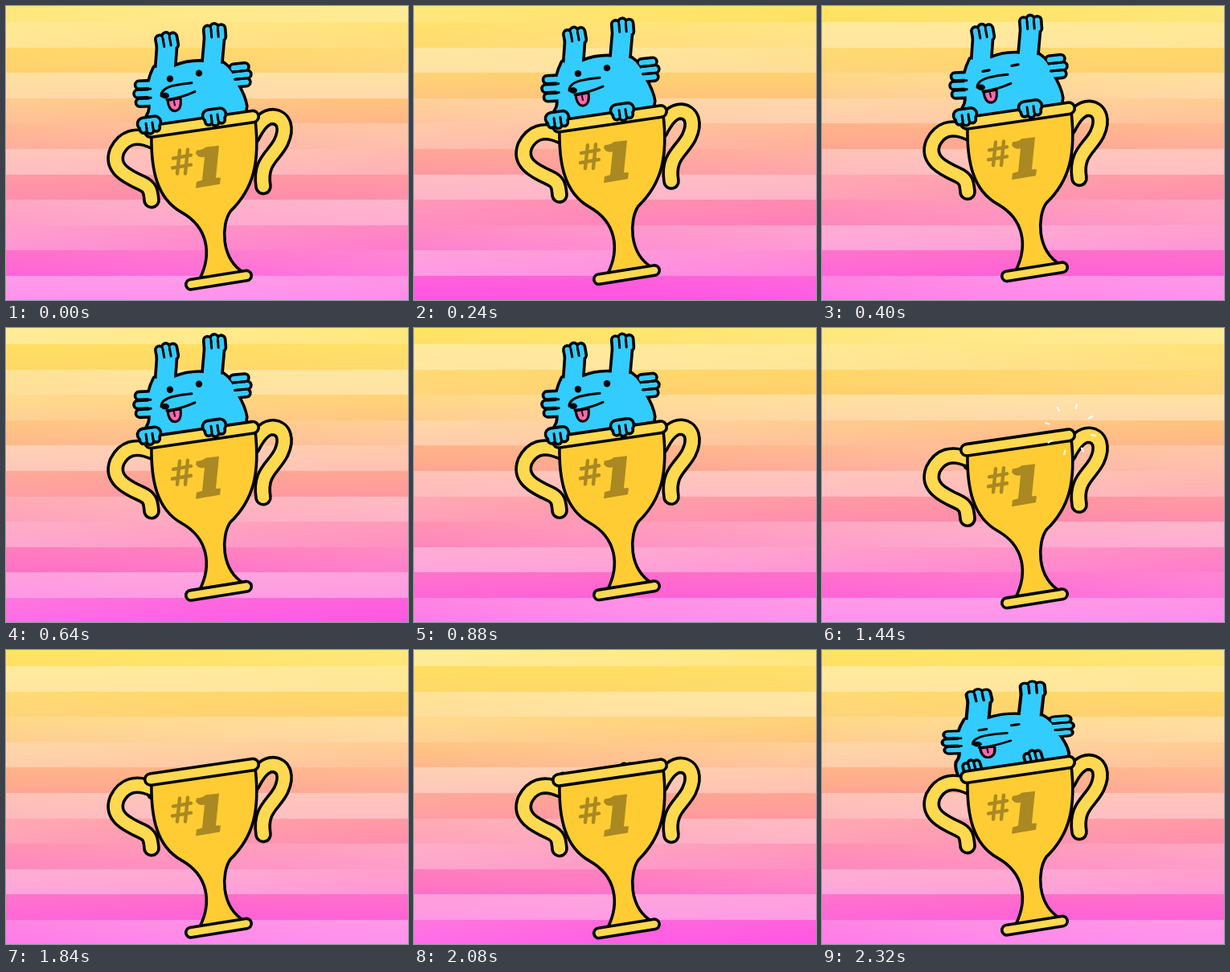
Recreate the animation shown at these times as an HTML page with a canvas. Size 500x366 px, loop 2400 ms.

```html
<!DOCTYPE html>
<html lang="en">
<head>
<meta charset="utf-8">
<title>Number one trophy</title>
<style>
html, body { margin: 0; width: 100%; height: 100%; overflow: hidden; }
canvas { display: block; width: 500px; height: 366px; }
</style>
</head>
<body>
<canvas id="stage" width="500" height="366"></canvas>
<script>
const ctx = document.getElementById('stage').getContext('2d');
const LOOP = 2400, STEP = 80, TAU = 2 * Math.PI;
const INK = '#000', GOLD = '#ffcc33', LIGHT = '#ffd94f', BLUE = '#33ccff', OLIVE = '#aa8922';
const LINE = 3.6;

const ramp = (t, from, to) => Math.max(0, Math.min(1, (t - from) / (to - from)));
const pulse = (t, peak, width) => Math.max(0, 1 - Math.abs(t - peak) / width);

function stroke(path, width, color = INK) {
  ctx.strokeStyle = color;
  ctx.lineWidth = width;
  ctx.stroke(path);
}

function fill(path, color) {
  ctx.fillStyle = color;
  ctx.fill(path);
}

function seg(x1, y1, x2, y2, width, color) {
  const p = new Path2D();
  p.moveTo(x1, y1);
  p.lineTo(x2, y2);
  stroke(p, width, color);
}

function oval(x, y, rx, ry, color) {
  const p = new Path2D();
  p.ellipse(x, y, rx, ry, 0, 0, TAU);
  fill(p, color);
}

// Thick outlined line with round ends.
function tube(path, size, color) {
  stroke(path, size + LINE);
  stroke(path, size - LINE, color);
}

// Background: a gradient under bands whose whiteness swings.
const base = ctx.createLinearGradient(0, 0, 0, 366);
['#ffdf3f', '#ffc658', '#ff9382', '#ff66ae', '#ff34e2']
  .forEach((c, i) => base.addColorStop(i / 4, c));

function background(t) {
  ctx.fillStyle = base;
  ctx.fillRect(0, 0, 500, 366);
  for (let i = 0; i < 12; i++) {
    const top = i && Math.round(31.6 * i - 11.6), end = Math.round(31.6 * i + 20);
    const glow = ctx.createLinearGradient(0, 0, 500, 0);
    for (let k = 0; k <= 2; k++) {
      const white = 0.31 + 0.16 * Math.sin(5 * TAU * t / LOOP + 2.4 * i + 0.5 * k);
      glow.addColorStop(k / 2, `rgba(255,255,255,${white})`);
    }
    ctx.fillStyle = glow;
    ctx.fillRect(0, top, 500, end - top);
  }
}

// Trophy
const leftHandle = new Path2D('M184 169C160 158 146 165 138 181C130 202 149 212 169 221C180 226 180 232 181 242');
const rightHandle = new Path2D('M306 163C316 143 324 138 332 138C346 139 350 153 342 170C333 188 315 194 320 225');
const bowl = new Path2D('M181 160C180 205 188 240 218 257C252 276 256 310 241 340' +
  'L297 333C266 315 268 272 279 256C308 228 316 195 310 142Z');
const foot = new Path2D('M230 347L299 336');
const rim = new Path2D('M180 156.5L307 138');
const hash = new Path2D('M216 180L213 209M226 179L223 209M208 190L230 186M207 202L230 198');
const one = new Path2D('M236 184L237 180Q246 179 248 176L265 174L261 214L267 214L266 222' +
  'L236 227L237 219L244 217L247 188Q240 190 236 184Z');

function trophy() {
  tube(leftHandle, 18, LIGHT);
  tube(rightHandle, 18, LIGHT);
  fill(bowl, GOLD);
  stroke(bowl, LINE);
  tube(foot, 12.5, LIGHT);
  tube(rim, 14.5, LIGHT);
  stroke(hash, 4.4, OLIVE);
  fill(one, OLIVE);
}

// Three parallel fingers with the folds between them.
function hand(x, y, angle, gap, len, size) {
  const c = Math.cos(angle), s = Math.sin(angle);
  const line = (k, a, b, width) =>
    [x - s * gap * k + c * a, y + c * gap * k + s * a, x - s * gap * k + c * b, y + c * gap * k + s * b, width];
  return {
    limbs: [-1, 0, 1].map(k => line(k, 0, len + (k ? 0 : 2), size)),
    folds: [-0.5, 0.5].map(k => line(k, 0, len, 3))
  };
}

// Joins limbs and hands into one outlined silhouette.
function merge(hands, limbs = [], torso = new Path2D()) {
  const all = [...limbs, ...hands.flatMap(h => h.limbs)];
  stroke(torso, LINE * 2);
  all.forEach(([a, b, c, d, w]) => seg(a, b, c, d, w + LINE));
  fill(torso, BLUE);
  all.forEach(([a, b, c, d, w]) => seg(a, b, c, d, w - LINE, BLUE));
  hands.forEach(h => h.folds.forEach(f => seg(...f)));
}

const torso = new Path2D('M184 170Q174 150 176 138Q183 128 177 112Q176 95 185 77' +
  'Q197 80 210 76Q224 70 240 70L270 72Q282 80 286 96Q296 112 298 125Q296 140 290 160Z');
const ears = [[198, 80, 200, 52, 25], [256, 76, 259, 42, 25]];
const tufts = [
  hand(180, 109, 3.1, 11, 14, 10), hand(284, 87, -0.1, 9.5, 14, 10),
  hand(201, 50, -1.75, 8.5, 10, 10), hand(260, 39, -1.65, 8.5, 10, 10)
];
const snout = new Path2D('M193 112Q193 104 206 100Q218 97 231 96M200 117Q217 115 235 107');
const tongue = new Path2D('M201 118Q203 131 210 131Q219 130 217 115Z');

function face(shut) {
  for (const [x, y] of [[204, 91], [240, 84]]) {
    if (shut) seg(x - 4, y + 1, x + 4, y - 0.5, 3.4);
    else oval(x, y, 4.2, 4.2, INK);
  }
  fill(tongue, '#ff66b3');
  stroke(tongue, 3);
  seg(209, 119, 210, 124, 2);
  stroke(snout, 3);
  oval(198, 112, 5, 3.8, INK);
}

function dog(t) {
  const drop = 150 * (t < 1700 ? ramp(t, 1000, 1200) ** 2 : (1 - ramp(t, 2120, 2320)) ** 2);
  if (drop >= 150) return;
  const squash = pulse(t, 2320, 80) + 0.4 * pulse(t, 960, 80);
  ctx.save();
  ctx.beginPath();
  ctx.moveTo(0, -60);
  ctx.lineTo(500, -60);
  ctx.lineTo(500, 110);
  ctx.lineTo(0, 182);
  ctx.clip();
  ctx.translate(238, 140 + drop);
  ctx.scale(1 + 0.12 * squash, 1 - 0.13 * squash);
  ctx.translate(-238, -140);
  merge(tufts, ears, torso);
  face((t >= 400 && t < 560) || t >= 2240);
  ctx.restore();
}

function grip(x, y) {
  merge([hand(x, y, 1.43, 8, 7, 9)], [[x - 7, y + 1, x + 7, y - 1, 15]]);
}

function peek(x, y) {
  merge([hand(x, y, -1.85, 7, 8, 8)]);
}

// Glint rays spreading from the rim.
function glint(t) {
  const k = ramp(t, 1280, 1600), r = 10 + 34 * k, tip = r + 5 * Math.sin(Math.PI * k);
  if (k === 0 || k === 1) return;
  for (let a = 0.25; a < TAU; a += TAU / 8) {
    const c = Math.cos(a), s = Math.sin(a);
    seg(309 + c * r, 131 + s * r, 309 + c * tip, 131 + s * tip, 2, '#fff');
  }
}

function bob(t) {
  const a = TAU * (t / LOOP - 1 / 3);
  return -4.6 - 10.3 * Math.cos(a) - 1.2 * Math.sin(a) ** 2;
}

function draw(t) {
  const holding = t < 1040;
  ctx.lineCap = ctx.lineJoin = 'round';
  background(t);
  ctx.save();
  ctx.translate(0, bob(t));
  dog(t);
  if (!holding) {
    const sink = 25 * ramp(t, 1200, 1280) * (1 - ramp(t, 2000, 2160));
    peek(188, 149 + sink);
    peek(264, 137 + sink);
  }
  trophy();
  if (holding) {
    grip(178, 146);
    grip(259, 136);
  }
  glint(t);
  ctx.restore();
}

const start = performance.now();
function tick() {
  const t = (performance.now() - start) % LOOP;
  draw(Math.floor(t / STEP) * STEP);
  requestAnimationFrame(tick);
}
tick();
</script>
</body>
</html>
```
